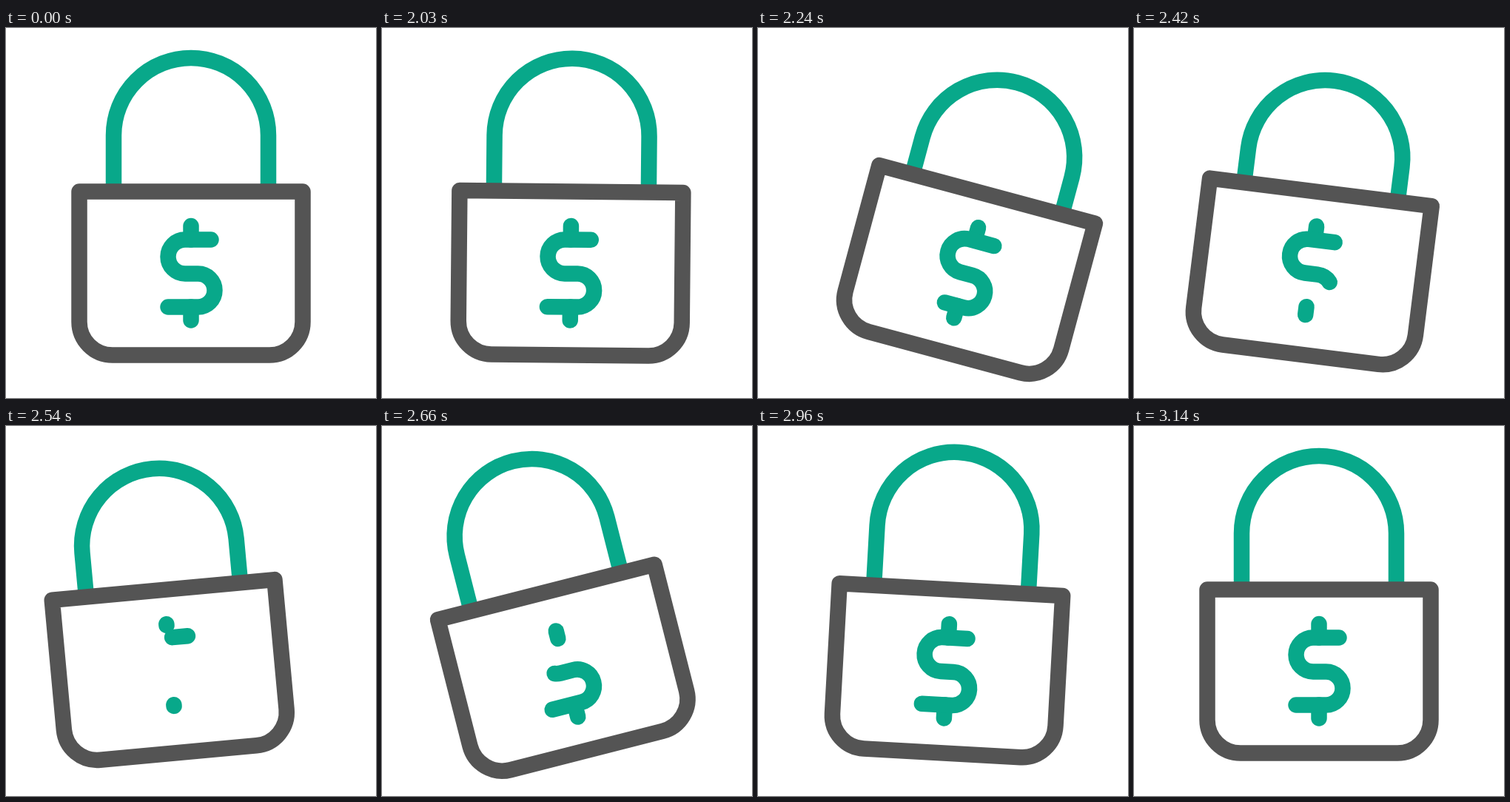
Write an HTML page that moves like this. It is 500 px wide and 500 px high and loops after 3.17 s.

```html
<!DOCTYPE html>
<html lang="en">
<head>
<meta charset="utf-8">
<title>Padlock</title>
<style>
  html, body { margin: 0; height: 100%; overflow: hidden; background: #fff; }
  svg { display: block; width: 100vw; height: 100vh; }
  path { fill: none; stroke: #08a88a; stroke-width: 21.5; stroke-linecap: round; stroke-linejoin: round; }
  #shackle { stroke-linecap: butt; }
  #body { stroke: #545454; }
</style>
</head>
<body>
<svg viewBox="0 0 500 500">
  <g id="lock">
    <path id="shackle"/>
    <path id="body" d="M99 221H401V397a45 45 0 0 1-45 45H144a45 45 0 0 1-45-45Z"/>
    <g id="dollar">
      <path pathLength="1" d="M250 286V267.5"/>
      <path pathLength="1" d="M250 395V377"/>
      <path pathLength="1" d="M219 377H259.5a22.5 22.5 0 0 0 0-45H242a23 23 0 0 1 0-46H277"/>
    </g>
  </g>
</svg>
<script>
const LOOP = 3170, REST = 2000, STEP = 30, LAST = 38, TURN = 18.5;
const $ = id => document.getElementById(id);
const lock = $('lock'), shackle = $('shackle'), dollar = $('dollar');

// Eases from rest through [step, value] turning points and back to rest.
// startSpeed lets the first swing set off at once.
function swing(turns, startSpeed = 0) {
  const keys = [[0, 0], ...turns, [LAST, 0]];
  return n => {
    const next = keys.findIndex(([at], i) => i > 0 && n <= at);
    const [n0, a] = keys[next - 1], [n1, b] = keys[next];
    const u = (n - n0) / (n1 - n0);
    const kick = next === 1 ? startSpeed * n * (1 - u) ** 2 : 0;
    return a + (b - a) * u * u * (3 - 2 * u) + kick;
  };
}

const shift = swing([[6.8, 33], [17.7, -27.5], [24.6, 11.5]], 4);
const tilt = swing([[9, 15.6], [23.5, -15.2], [28.6, 4.5]]);
const sink = swing([[11, 29.5], [13, 29.5], [26, -11]]);

// Every dollar stroke is wiped from its lower end, then drawn again from there.
function inkRange(n) {
  if (n < TURN) return [(n / TURN) ** 3.4, 1];
  return [0, 1 - ((LAST - n) / (LAST - TURN)) ** 4.4];
}

function draw(time) {
  const n = Math.max(0, Math.floor((time % LOOP - REST) / STEP));
  lock.setAttribute('transform', `translate(${shift(n)}) rotate(${tilt(n)} 250 331.5)`);
  shackle.setAttribute('d', `M145.5 221V${145 + sink(n)}a104.5 104.5 0 0 1 209 0V221`);
  const [from, to] = inkRange(n);
  dollar.style.strokeDasharray = `${to - from} 2`;
  dollar.style.strokeDashoffset = -from;
}

const start = performance.now();
function tick() {
  draw(performance.now() - start);
  requestAnimationFrame(tick);
}
tick();
</script>
</body>
</html>
```
